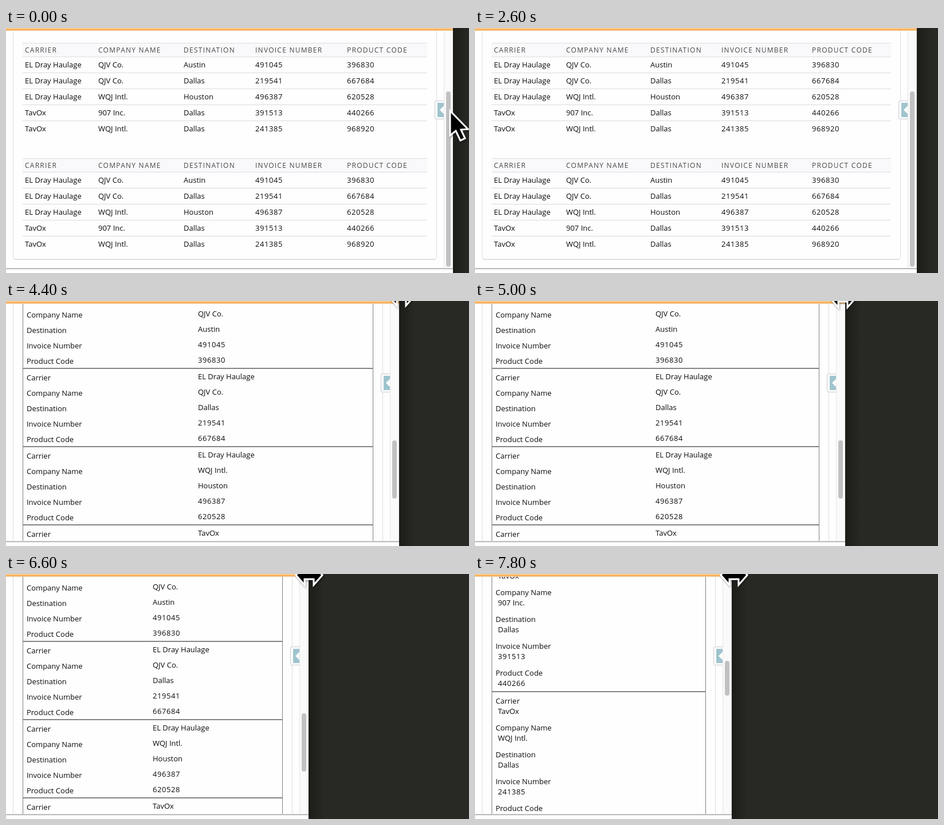
Write an HTML page that moves like this. It is 808 px wide and 429 px high and loops after 8000 ms.

```html
<!DOCTYPE html>
<html lang="en">
<head>
<meta charset="utf-8">
<title>Responsive table</title>
<style>
  html, body { margin: 0; width: 100%; height: 100%; overflow: hidden; background: #282824; }
  svg { display: block; width: 808px; height: 429px; }
  text { font: 13px "Open Sans", "Noto Sans", sans-serif; fill: #0c0c0c; white-space: pre; }
  .num { letter-spacing: .55px; }
  .head { font-size: 12px; letter-spacing: 1.25px; fill: #484848; }
</style>
</head>
<body>
<svg id="stage" viewBox="0 0 808 429">
  <defs>
    <linearGradient id="shade">
      <stop offset="0" stop-color="#1c1c19"/><stop offset="1" stop-color="#282824"/>
    </linearGradient>
    <clipPath id="windowClip"><rect id="windowRect" height="429"/></clipPath>
    <clipPath id="paneClip"><rect y="5" width="808" height="416"/></clipPath>
    <filter id="soft" x="-30%" y="-30%" width="180%" height="180%">
      <feDropShadow dx="1" dy="2" stdDeviation="1.5" flood-opacity=".4"/>
    </filter>
  </defs>
  <g id="scene"></g>
</svg>
<script>
const LOOP = 8000, STEP = 200;
const LABELS = ['Carrier', 'Company Name', 'Destination', 'Invoice Number', 'Product Code'];
const POST = 'EL Dray Haulage', EXPRESS = 'TavOx';
const ROWS = [
  [POST, 'QJV Co.', 'Austin', '491045', '396830'],
  [POST, 'QJV Co.', 'Dallas', '219541', '667684'],
  [POST, 'WQJ Intl.', 'Houston', '496387', '620528'],
  [EXPRESS, '907 Inc.', 'Dallas', '391513', '440266'],
  [EXPRESS, 'WQJ Intl.', 'Dallas', '241385', '968920'],
];

// Tracks are [time, value] pairs joined linearly.
const WINDOW = [[0, 780], [2200, 780], [2600, 771], [3600, 733], [4400, 686], [5800, 592], [6600, 528], [7800, 448]];
// The page layout trails the window edge briefly while it is dragged.
const LAYOUT = [...WINDOW.slice(0, 5), [5600, 605], [5800, 602], [6000, 576], ...WINDOW.slice(6)];
const ARROW_X = [[0, 775], [1200, 780]];
const ARROW_Y = [[0, 145], [200, 145], [1200, -60]];
const RESIZE_X = [[2600, 772], [3600, 731], [4400, 690], [5800, 578], [6600, 529], [7800, 452]];
const RESIZE_Y = [[2600, -26], [3600, -10], [4400, -9], [5800, -2], [6600, 2]];

function sample(track, t) {
  const next = track.findIndex(([time]) => time > t);
  if (next < 0) return track[track.length - 1][1];
  if (next === 0) return track[0][1];
  const [t0, a] = track[next - 1], [t1, b] = track[next];
  return a + (b - a) * (t - t0) / (t1 - t0);
}

const rect = (x, y, w, h, fill, extra = '') =>
  `<rect x="${x}" y="${y}" width="${w}" height="${h}" fill="${fill}" ${extra}/>`;
const hline = (x1, x2, y, color) => rect(x1, y, x2 - x1, 1, color);
const text = (x, middle, s, cls = /^\d+$/.test(s) ? 'num' : '') =>
  `<text x="${x}" y="${middle + 5}" class="${cls}">${s}</text>`;

function wideTable(width, top) {
  const right = width - 45;
  const columns = [33, 161, 310, 435, 595].map((x, i) =>
    Math.round(x + (width - 780) * [0, 2, 4, 5, 7][i] / 9));
  let out = rect(29, top, right - 29, 25, '#f9f9fb') +
    hline(29, right, top, '#dcdee1') + hline(29, right, top + 24, '#dcdee1');
  LABELS.forEach((label, i) => out += text(columns[i], top + 12, label.toUpperCase(), 'head'));
  ROWS.forEach((row, r) => {
    row.forEach((value, i) => out += text(columns[i], top + 38 + 28 * r, value));
    if (r < 4) out += hline(29, right, top + 52 + 28 * r, '#d9dbdd');
  });
  return out;
}

function cards(width, top, height, pitch, valueX, valueShift) {
  let out = rect(29, 0, 1, 429, '#808080') + rect(width - 46, 0, 1, 429, '#808080');
  ROWS.forEach((row, r) => {
    const y = top + r * height;
    out += rect(29, y - 1, width - 74, 2, '#858585');
    row.forEach((value, i) => {
      const middle = y + 16 + pitch * i;
      out += text(36, middle, LABELS[i]) + text(valueX, middle + valueShift, value);
    });
  });
  return out;
}

function content(width) {
  if (width >= 768) return wideTable(width, 26) + wideTable(width, 228);
  if (width >= 480) return cards(width, -19, 137, 27, Math.round(256 + (width - 528) / 2), -2);
  return cards(width, 206 - 4 * 237, 237, 47, 40, 18);
}

function panel(width) {
  const wide = width >= 768;
  return rect(12.5, -20, width - 41, wide ? 425 : 480, 'none', 'rx="4" stroke="#dcdddf"') +
    (wide ? hline(15, width - 31, 405, '#d2d3d5') : '');
}

function sideHandle(x) {
  return `<path d="M${x + 16} 127.5H${x + 4}q-3.5 0-3.5 3.5v25q0 3.5 3.5 3.5H${x + 16}" fill="#fdfdfd" stroke="#d8dadd" stroke-width="1.5"/>` +
    rect(x + 5, 131, 11, 25, '#9fc4ce') +
    `<path d="M${x + 9} 143.5l7-7v14z" fill="#fff"/>`;
}

function scrollbar(width) {
  const [top, height] = width >= 768 ? [111, 307] : width >= 480 ? [244, 102] : [152, 61];
  return rect(width - 15, 5, 15, 416, '#fafafa') +
    rect(width - 16, 5, 1, 416, '#e6e6e9') + rect(width - 1, 5, 1, 416, '#ececec') +
    rect(width - 12, top, 8, height, '#c1c1c1', 'rx="4"');
}

function pointer(x, y, points) {
  return `<polygon transform="translate(${x} ${y})" points="${points}" fill="#000" stroke="#fff" stroke-width="3" filter="url(#soft)"/>`;
}

function cursor(t) {
  return t < 2600
    ? pointer(sample(ARROW_X, t), sample(ARROW_Y, t), '0,0 0,43 10,35 18,52 26,48 19,33 31,32')
    : pointer(sample(RESIZE_X, t), sample(RESIZE_Y, t),
        '-23,0 -8,-17 -8,-7 8,-7 8,-17 23,0 8,17 8,7 -8,7 -8,17');
}

const scene = document.getElementById('scene');
const windowRect = document.getElementById('windowRect');

function draw(t) {
  const edge = Math.round(sample(WINDOW, t));
  const width = Math.round(sample(LAYOUT, t));
  windowRect.setAttribute('width', edge);
  scene.innerHTML =
    rect(0, 0, 808, 429, '#282824') + rect(edge, 0, 28, 429, 'url(#shade)') +
    `<g clip-path="url(#windowClip)">
      ${rect(0, 0, 808, 429, '#fefefe')}
      <g clip-path="url(#paneClip)">${panel(width)}${content(width)}${scrollbar(width)}${sideHandle(width - 32)}</g>
      ${rect(0, 0, 808, 1, '#fbdcb2')}${rect(0, 1, 808, 3, '#fbb35c')}${rect(0, 4, 808, 1, '#e6cfb0')}
      ${hline(0, 808, 420, '#d5d5d5')}${hline(0, 808, 421, '#a9a9a9')}${hline(0, 808, 422, '#ededed')}
    </g>` + cursor(t);
}

let shown = -1;
function tick(now) {
  const t = Math.floor(now % LOOP / STEP) * STEP;
  if (t !== shown) draw(shown = t);
  requestAnimationFrame(tick);
}
draw(0);
requestAnimationFrame(tick);
</script>
</body>
</html>
```
